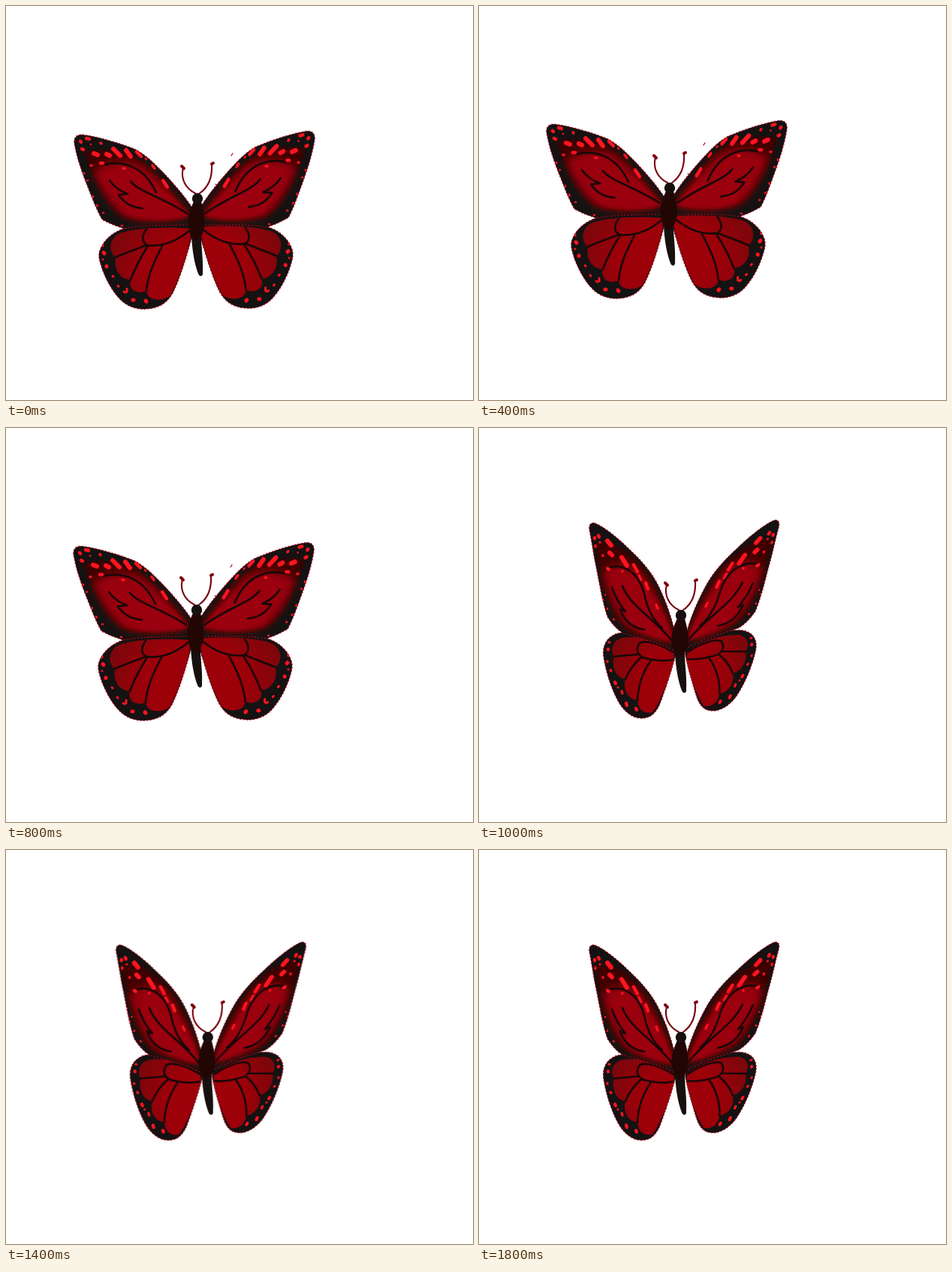
An HTML page that plays this animation: 622x524 px, repeating every 2 s.

```html
<!DOCTYPE html>
<html lang="en">
<head>
<meta charset="utf-8">
<title>Butterfly</title>
<style>
  html, body { margin: 0; width: 100%; height: 100%; overflow: hidden; background: #fff; }
  svg { display: block; width: 622px; height: 524px; }
  path { fill: none; stroke-linecap: round; stroke-linejoin: round; }
  .base { fill: #141212; }
  .edge { stroke: #c00018; stroke-width: 1.2; stroke-dasharray: 2 2.5; stroke-linecap: butt; }
  .red { fill: #9a0009; }
  .cells { fill: url(#cellRed); }
  .shade { fill: #400406; }
  .vein { stroke: #1a0808; stroke-width: 2.7; }
  .spot { stroke: #ff1420; }
  .feeler { stroke: #78000e; stroke-width: 2.1; }
  .knob { stroke: #80000e; stroke-width: 4; }
  .thorax { fill: #220604; }
  .tail { fill: #16100f; }
  .stray { stroke: #c00018; stroke-width: 1.3; }
</style>
</head>
<body>
<svg id="stage" viewBox="0 0 622 524" xmlns="http://www.w3.org/2000/svg"></svg>
<script>
// Each wing is drawn once for the left side; anchors map it to the right side.
const wings = {
  openHind: {
    from: [124, 332, 184, 403, 247, 300],
    to: [382, 330, 323, 402, 259, 298],
    outline: 'M247 289C225 289 180 290 157 296C135 303 122 322 124 335C127 352 138 375 150 388C160 400 175 404 187 403C203 402 214 396 222 382C232 362 240 335 248 306Z',
    red: 'M244 296C215 293 165 295 148 304C138 312 136 325 146 335C143 350 152 364 166 364C162 378 176 384 187 379C188 392 207 394 219 385C230 365 240 335 246 308Z',
    vein: 'M187 297C181 305 180 314 188 318C210 321 228 312 244 299M146 334C158 329 172 324 187 318M166 364C172 348 180 333 189 319M187 379C189 355 200 335 208 319',
    spots: [
      [5, 'M130 328l1 1M134 346l0 .5M169 391l1 0M186 392l1 1'],
      [3, 'M129 318l0 1M142 359l1 1M149 372l1 1M157 380l2 1M161 376l0 4M129 337l0 0']
    ]
  },
  openFore: {
    from: [92, 173, 155, 294, 246, 285],
    to: [410, 168, 350, 292, 261, 285],
    outline: 'M248 268C236 250 218 230 203 215C192 204 183 196 171 190C150 182 124 174 101 171C93 171 90 176 91 183C94 201 101 221 109 241C115 256 121 272 128 284C137 289 147 293 157 296C185 291 220 292 248 291Z',
    shade: 'M104 194C125 190 150 191 174 202C197 217 224 250 245 279C220 286 180 287 158 281C137 270 119 235 104 194Z',
    glow: 'M117 220C135 206 160 204 179 211C198 223 224 252 245 280C215 288 180 288 158 279C141 267 126 243 117 220Z',
    red: 'M175 228C200 235 226 256 244 279C218 285 186 287 160 276C150 262 160 240 175 228Z',
    vein: 'M130 211C156 205 184 213 200 248M166 233C176 247 212 256 241 276M138 232C145 242 153 246 162 250L150 251C157 262 168 268 182 269',
    spots: [
      [6, 'M117 196l5 2M143 190l9 9M160 192l6 8M134 197l4 2'],
      [4.5, 'M99 180l1 1M101 190l2 1M107 176l4 1M174 194l6 6M126 209l3 0M209 232l6 9'],
      [3.5, 'M113 212l1 0M156 216l2 0M195 212l3 4M126 182l1 1'],
      [2.6, 'M104 222l0 1M108 232l1 0M116 253l0 1M121 265l1 1M129 275l1 0M154 292l1 0M113 184l0 0M186 203l1 1']
    ]
  },
  shutHind: {
    from: [165, 295, 217, 386, 260, 296],
    to: [370, 288, 313, 376, 277, 296],
    outline: 'M262 286C235 276 205 269 185 273C168 278 164 292 166 305C169 325 177 350 188 368C197 381 208 387 219 386C230 385 236 378 241 367C248 348 256 325 262 302Z',
    red: 'M259 297C240 284 215 276 190 279C178 283 175 293 179 304C177 318 182 332 195 334C191 348 199 361 211 362C212 376 222 381 231 378C243 362 252 335 260 310Z',
    vein: 'M258 298C243 288 222 281 214 286C207 296 212 305 225 307C240 310 250 310 258 308M179 304C190 303 200 302 212 301M195 334C200 322 208 312 216 305M211 362C212 340 220 322 229 309',
    spots: [
      [4.2, 'M172 294l0 1M181 338l1 2M196 366l1 3M209 373l1 2'],
      [3.2, 'M173 285l1 0M171 310l0 1M175 322l1 1M190 350l1 3M185 345l0 0']
    ]
  },
  shutFore: {
    from: [148, 126, 191, 272, 260, 288],
    to: [399, 122, 347, 265, 277, 285],
    outline: 'M262 277C258 255 249 231 241 214C231 192 216 176 200 161C185 146 165 130 153 126C148 126 146 130 147 136C150 150 153 172 157 190C161 210 164 230 171 251C178 262 184 268 192 273C212 279 238 285 262 297Z',
    shade: 'M154 152C176 150 196 161 213 180C233 203 250 245 261 285C235 281 208 275 193 264C176 245 163 203 154 152Z',
    glow: 'M165 192C178 178 198 178 215 192C233 216 250 248 260 286C235 282 212 274 196 262C182 245 171 219 165 192Z',
    red: 'M216 208C235 226 251 252 259 284C236 280 212 271 198 257C190 238 200 218 216 208Z',
    vein: 'M168 188C188 178 211 188 220 220C224 240 232 256 244 266M191 210C202 238 232 252 257 283M177 212C183 229 190 238 195 244L188 241C194 258 206 266 220 268',
    spots: [
      [6, 'M171 150l5 6M174 166l3 3M190 172l7 11'],
      [4.5, 'M154 146l0 1M159 143l1 2M206 182l5 9M171 187l2 1M222 206l3 8'],
      [3.2, 'M155 156l0 2M191 190l0 1M161 152l0 0M165 169l0 1M213 196l3 6M236 235l2 5'],
      [2.4, 'M161 211l0 1M165 228l0 1M171 240l0 1M179 254l1 1M168 222l0 0']
    ]
  }
};

const path = (cls, d, extra = '') => `<path class="${cls}" d="${d}" ${extra}/>`;

// Affine matrix carrying one triangle onto another.
function affine(s, d) {
  const [x0, y0, x1, y1, x2, y2] = s;
  const ux = x1 - x0, uy = y1 - y0, vx = x2 - x0, vy = y2 - y0;
  const det = ux * vy - vx * uy;
  const row = k => {
    const p = d[2 + k] - d[k], q = d[4 + k] - d[k];
    const a = (p * vy - q * uy) / det, b = (q * ux - p * vx) / det;
    return [a, b, d[k] - a * x0 - b * y0];
  };
  const [a, c, e] = row(0), [b, f, g] = row(1);
  return `matrix(${[a, b, c, f, e, g]})`;
}

function wing(id) {
  const w = wings[id];
  const inner = w.glow
    ? path('shade', w.shade, 'filter="url(#soft)"') +
      path('red', w.glow, 'filter="url(#softer)"') + path('red', w.red, 'filter="url(#soft)"')
    : path('cells', w.red);
  const spots = w.spots.map(([size, d]) => path('spot', d, `stroke-width="${size}"`)).join('');
  return `<g id="${id}">${path('base', w.outline)}<clipPath id="${id}Clip"><path d="${w.outline}"/></clipPath>
    <g clip-path="url(#${id}Clip)">${inner}${path('vein', w.vein)}${spots}</g>
    ${path('edge', w.outline)}</g>
    <use href="#${id}" transform="${affine(w.from, w.to)}"/>`;
}

const body =
  path('feeler', 'M252 249C240 243 232 231 236 215M258 249C271 240 275 226 274 210') +
  path('knob', 'M234 213l3 3M274 210l2-1') +
  path('tail', 'M247 305C248 326 251 343 256 356C258 361 263 360 262 354C263 338 260 322 260 305Z') +
  path('thorax', 'M250 260C246 270 241 280 243 292C245 303 248 310 252 312C257 312 262 306 264 295C266 283 263 272 260 260Z') +
  '<circle class="tail" cx="255" cy="256" r="7.2"/>';

document.getElementById('stage').innerHTML = `
  <defs>
    <filter id="soft"><feGaussianBlur stdDeviation="2"/></filter>
    <filter id="softer"><feGaussianBlur stdDeviation="6"/></filter>
    <radialGradient id="cellRed" cx=".9" cy=".6" r=".95">
      <stop offset=".5" stop-color="#9c0009"/><stop offset="1" stop-color="#7c060b"/>
    </radialGradient>
  </defs>
  <g id="open">${wing('openHind')}${wing('openFore')}${body}${path('stray', 'M300 199l2-3M279 237l2 1')}</g>
  <g id="shut">${wing('shutHind')}${wing('shutFore')}<g transform="translate(14 -7)">${body}</g></g>`;

// Pose and offset for each 200 ms step.
const steps = [
  ['open', 0, 0], ['shut', 0, 0],
  ['open', -1, -14], ['shut', -0.6, 0],
  ['open', -1, -14], ['shut', 0, 0],
  ['open', -1.5, -14], ['shut', -0.3, 0],
  ['open', -0.8, -14], ['shut', 0, 0]
];

for (const id of ['open', 'shut']) {
  const frames = steps.map(([pose, x, y], i) => ({
    offset: i / steps.length,
    easing: 'step-end',
    opacity: pose === id ? 1 : 0,
    transform: `translate(${x}px, ${y}px)`
  }));
  frames.push({ ...frames[frames.length - 1], offset: 1 });
  document.getElementById(id).animate(frames, { duration: 200 * steps.length, iterations: Infinity });
}
</script>
</body>
</html>
```
